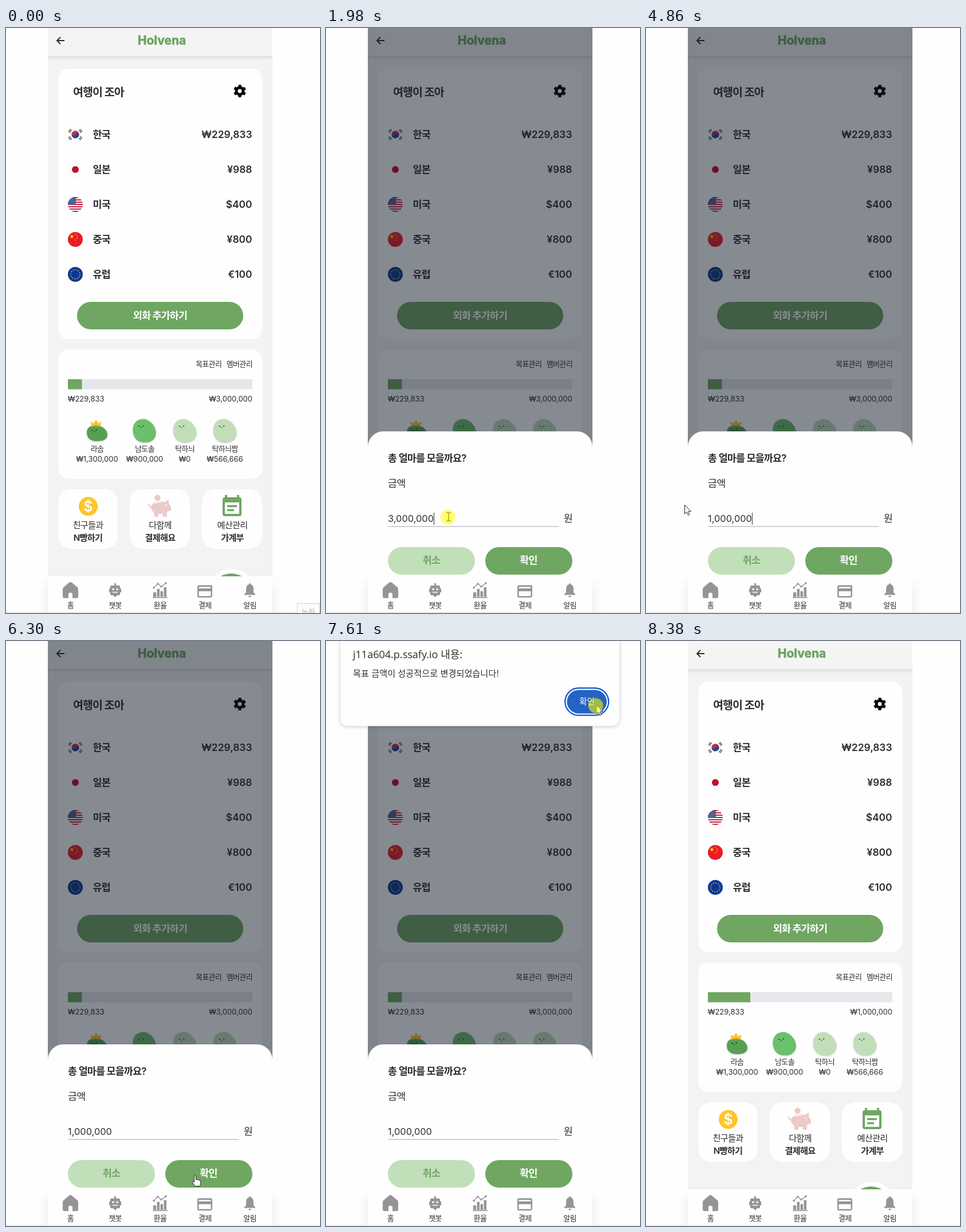
Recreate the animation shown at these times as an HTML page. Size 548 by 1021 pixels, loop 9.97 s.

```html
<!DOCTYPE html>
<html lang="ko">
<head>
<meta charset="utf-8">
<title>여행 모임 통장</title>
<style>
  html, body { margin: 0; width: 100%; height: 100%; overflow: hidden; background: #fefefe; }
  svg { display: block; width: 100%; height: 100%; }
  text { font: 13px Inter, "Noto Sans CJK KR", sans-serif; fill: #2e2e2e; }
  .k { letter-spacing: -.05em; }
  .b { font-weight: 600; }
  .l { font-size: 17.4px; }
  .n { font-size: 15.2px; }
  .m { text-anchor: middle; }
  .e { text-anchor: end; }
  .w { fill: #fff; }
  .g { fill: #6fa661; }
  .input { font-size: 16.4px; }
  .brand { font-size: 21px; font-weight: 700; fill: #6aa55f; stroke: #6aa55f; stroke-width: .6; stroke-linejoin: round; }
  .host { font: 18px "Open Sans", "Noto Sans CJK KR", sans-serif; }
  .notice { font: 15.2px "Noto Sans CJK KR", sans-serif; }
  .shade { filter: drop-shadow(0 1px 3px rgba(0,0,0,.22)); }
  .headshade { filter: drop-shadow(0 2px 3px rgba(0,0,0,.13)); }
  .soft { filter: drop-shadow(0 1.5px 1px rgba(0,0,0,.25)); }
  .navshade { filter: drop-shadow(0 14px 10px rgba(0,0,0,.1)); }
</style>
</head>
<body>
<svg viewBox="0 0 548 1021">
  <defs>
    <clipPath id="disc"><circle r="13"/></clipPath>
    <clipPath id="column"><rect x="73" width="392" height="957"/></clipPath>
    <clipPath id="selClip"><rect id="selMask" y="844" height="23"/></clipPath>
    <path id="star" d="M0-1 .24-.31 .95-.31 .38 .12 .59 .81 0 .4-.59 .81-.38 .12-.95-.31-.24-.31Z"/>
    <g id="face"><circle cx="-3.7" r="1"/><circle cx="3.7" cy="-.5" r="1"/><path d="M-1.4 1.8Q0 3.2 1.4 1.6" fill="none" stroke="#222" stroke-width=".8"/></g>
    <path id="bean" d="M-6-20C6-23 18-11 20 0C22 12 14 20 3 20C-12 21-20 12-20-2C-20-12-14-19-6-20Z"/>
  </defs>

  <rect width="548" height="1021" fill="#fefefe"/>
  <g clip-path="url(#column)">
    <rect x="73" width="392" height="1021" fill="#f3f3f3"/>
    <rect class="headshade" x="63" y="-5" width="412" height="54" fill="#f4f4f4"/>
    <path d="M102 22H89.5M95 16 89 22 95 28" fill="none" stroke="#2b2b2b" stroke-width="2"/>
    <text class="brand m" x="272" y="29">Holvena</text>

    <g fill="#fefefe">
      <rect x="91" y="71" width="356" height="472" rx="18"/>
      <rect x="91" y="561" width="356" height="226" rx="18"/>
      <rect x="91" y="805" width="104" height="104" rx="22"/>
      <rect x="216" y="805" width="105" height="104" rx="22"/>
      <rect x="342" y="805" width="105" height="104" rx="22"/>
    </g>
    <text class="k b" x="117" y="119" style="font-size:19.5px">여행이 조아</text>
    <g transform="translate(408 110)" fill="none" stroke="#000">
      <circle r="6" stroke-width="5"/>
      <circle r="9" stroke-width="3.8" stroke-dasharray="4.9 4.525" transform="rotate(14)"/>
    </g>

    <g id="accounts"></g>
    <g transform="translate(121 186)">
      <g stroke="#333" stroke-width="1.3">
        <path d="M-11.7-4.3-8.5-9.5M8.5 9.5 11.7 4.3M-11.7 4.3-8.5 9.5M8.5-9.5 11.7-4.3"/>
        <path d="M-9.7-3.2-6.5-8.4M6.5 8.4 9.7 3.2M-9.7 3.2-6.5 8.4M6.5-8.4 9.7-3.2" stroke-dasharray="2.7 .7"/>
      </g>
      <g transform="rotate(25)"><circle r="6.5" fill="#0f4aa0"/><path d="M-6.5 0A6.5 6.5 0 0 1 6.5 0A3.25 3.25 0 0 1 0 0A3.25 3.25 0 0 0-6.5 0" fill="#cf2c3c"/><circle cx="-3.25" r="3.25" fill="#cf2c3c"/><circle cx="3.25" r="3.25" fill="#0f4aa0"/></g>
    </g>
    <g transform="translate(121 247)"><circle r="12.7" fill="#fff" stroke="#f0f0f0" stroke-width=".7"/><circle r="6" fill="#c40d2e"/></g>
    <g transform="translate(121 308)" clip-path="url(#disc)">
      <rect x="-13" y="-13" width="26" height="26" fill="#fff"/>
      <path d="M0-13V13" stroke="#c4203b" stroke-width="26" stroke-dasharray="2"/>
      <rect x="-13" y="-13" width="14" height="14" fill="#39457d"/>
      <path d="M-12-10.5H1M-11-8H1M-12-5.5H1M-11-3H1M-12-.5H1" stroke="#fff" stroke-width=".9" stroke-dasharray="1 1.4"/>
    </g>
    <g transform="translate(121 369)"><circle r="13" fill="#e91c24"/>
      <g fill="#ffdf20"><use href="#star" transform="translate(-6 -5)scale(4)"/><use href="#star" transform="translate(0 -9)scale(1.4)"/><use href="#star" transform="translate(3 -6)scale(1.4)"/><use href="#star" transform="translate(3 -2)scale(1.4)"/><use href="#star" transform="translate(0 1)scale(1.4)"/></g>
    </g>
    <g transform="translate(121 430)"><circle r="13" fill="#0c3796"/><circle r="8" fill="none" stroke="#f5d020" stroke-width="1.6" stroke-dasharray="1.6 2.589"/></g>

    <rect class="g" x="124" y="478" width="290" height="48" rx="24"/>
    <text class="k b l m w" x="269" y="508">외화 추가하기</text>

    <text class="k" x="331" y="591">목표관리</text>
    <text class="k e" x="430" y="591">멤버관리</text>
    <rect x="108" y="613" width="322" height="17.5" fill="#e5e7eb"/>
    <rect id="bar" class="g" x="108" y="613" height="17.5"/>
    <text x="108" y="652">₩229,833</text>
    <text id="goal" class="e" x="430" y="652"></text>

    <g class="soft">
      <path transform="translate(159 707)" fill="#57a052" d="M-18-1C-18-12-8-15 2-13C12-11 18-4 18 3C18 11 10 14 0 14C-12 14-18 8-18-1Z"/>
      <use href="#bean" x="241.5" y="703" fill="#6bc06b"/>
      <use href="#bean" x="312" y="703" fill="#c1deb9"/>
      <use href="#bean" x="382" y="703" fill="#c1deb9"/>
    </g>
    <path d="M149 696 147.5 687 152.5 690 157 684 161.5 690 166.5 687 165 696Q157 693 149 696Z" fill="#fbc52d"/>
    <path d="M150 694.5Q157 692 164 694.5" fill="none" stroke="#e89a25"/>
    <g fill="#222"><use href="#face" x="154" y="702"/><use href="#face" x="236" y="695"/><use href="#face" x="306.5" y="695"/><use href="#face" x="376.5" y="695"/></g>
    <g id="members"></g>

    <circle cx="143.5" cy="835" r="16.5" fill="#fdc52b"/>
    <text class="m w b" x="143.5" y="844" style="font-size:25px">$</text>
    <g fill="#ebcaca">
      <circle cx="264.5" cy="820" r="5.3"/>
      <ellipse cx="269" cy="837" rx="16" ry="11"/>
      <path d="M276 828 284 823V830L288 836V842L282 844ZM258 844H266V853H259ZM273 844H281V853H274Z"/>
      <path d="M254 836Q249 836 249 830" fill="none" stroke="#ebcaca" stroke-width="2"/>
    </g>
    <path d="M260 829.5Q266 826.5 271 828" fill="none" stroke="#fff" stroke-width="1.7"/>
    <circle cx="279" cy="833" r="1.3" fill="#fff"/>
    <path d="M382 815H386V819H403V815H407V819Q411 819 411 823V848Q411 852 407 852H382Q378 852 378 848V823Q378 819 382 819Z" class="g"/>
    <path d="M382 828H407V848H382Z" fill="#fff"/>
    <path d="M386 834.5H403M386 841.5H398" stroke="#6fa661" stroke-width="3.5"/>
    <g id="shortcuts"></g>
    <circle cx="394" cy="987" r="43" fill="#fefefe"/><circle class="g" cx="393" cy="988" r="36"/>
  </g>

  <g id="modal" clip-path="url(#column)">
    <rect x="73" width="392" height="957" fill="rgba(17,24,39,.5)"/>
    <rect x="73" y="704" width="392" height="300" rx="27" fill="#fefefe"/>
    <text class="k b l" x="108" y="757">총 얼마를 모을까요?</text>
    <text class="k l" x="108" y="801">금액</text>
    <rect id="selBox" y="844" height="23" fill="#2f7fe0"/>
    <text id="amount" class="input" x="108" y="862"></text>
    <text class="input w" x="108" y="862" clip-path="url(#selClip)">3,000,000</text>
    <rect id="caret" y="846" width="1" height="21" fill="#333"/>
    <path d="M108 870H406" stroke="#d0cfd8" stroke-width="2"/>
    <text class="k l e" x="430" y="862">원</text>
    <rect x="108" y="906" width="152" height="48" rx="24" fill="#c1dfb9"/>
    <rect class="g" x="278" y="906" width="152" height="48" rx="24"/>
    <text class="k b l m g" x="184" y="935">취소</text>
    <text class="k b l m w" x="353.5" y="935">확인</text>
  </g>

  <rect class="navshade" x="73" y="957" width="392" height="64" fill="#fefefe"/>
  <g fill="#969496">
    <path d="M110 968Q112.5 966 115 968L124.5 976Q126 977.5 126 980V992Q126 995 123 995H116V988Q116 985.5 112.5 985.5T109 988V995H102Q99 995 99 992V980Q99 977.5 100.5 976Z"/>
    <path d="M189 969H192V973H197Q199 973 199 975V978H201V985H199V988Q199 990 197 990H194L190.5 993.5 187 990H184Q182 990 182 988V985H180V978H182V975Q182 973 184 973H189Z"/>
    <path d="M257 985H262V993H257ZM263.5 979H268V993H263.5ZM269.5 983H274V993H269.5ZM275.5 976H280V993H275.5ZM256 993.5H282V995H256Z"/>
    <path d="M258 977 265 970 271 975 279 969" fill="none" stroke="#969496" stroke-width="1.4"/>
    <circle cx="258" cy="977" r="1.8"/><circle cx="265" cy="970" r="1.8"/><circle cx="271" cy="975" r="1.8"/><circle cx="279" cy="969" r="1.8"/>
    <path fill-rule="evenodd" d="M337 972.5H357Q360 972.5 360 975.5V991Q360 994 357 994H337Q334 994 334 991V975.5Q334 972.5 337 972.5ZM336.5 975.5V978H357.5V975.5ZM336.5 983V991.5H357.5V983Z"/>
    <path d="M425.5 969Q427 969 427 971Q432 972.5 432 979V985L435 988V989.5H416V988L419 985V979Q419 972.5 424 971Q424 969 425.5 969ZM423 991H428Q427.5 993.5 425.5 993.5T423 991Z"/>
  </g>
  <g fill="#fefefe"><circle cx="187" cy="979.5" r="1.7"/><circle cx="194" cy="979.5" r="1.7"/><path d="M186 984H195V985.5H186Z"/></g>
  <g id="nav"></g>
  <path d="M0 1020.5H548" stroke="#dcdcdc"/>

  <g id="tooltip">
    <rect x="508.5" y="1004.5" width="38.5" height="20" fill="#fdfdfd" stroke="#cfcfcf"/>
    <text class="m" x="527.5" y="1024" style="fill:#b5b5b5">녹화</text>
  </g>

  <g id="alert">
    <rect class="shade" x="25" y="-20" width="487" height="168.5" rx="13" fill="#fefefe"/>
    <text class="host" x="47" y="30">j11a604.p.ssafy.io 내용:</text>
    <text class="notice" x="47" y="62">목표 금액이 성공적으로 변경되었습니다!</text>
    <rect x="417.2" y="82.2" width="76" height="47.5" rx="23.7" fill="none" stroke="#0b57d0" stroke-width="2.2"/>
    <rect id="alertOk" x="420.5" y="85.5" width="69.5" height="41" rx="20.5"/>
    <text class="m w" x="455.5" y="111" style="font-size:14.5px">확인</text>
  </g>

  <g id="cursor" stroke="#222" fill="#fff" stroke-linejoin="round">
    <path id="arrow" d="M0 0V15.5L3.6 12.3 6 17.7 8.5 16.6 6.2 11.3H11Z"/>
    <path id="beam" fill="none" stroke-width="1.3" d="M-4-7.5Q0-7.5 0-5.5Q0-7.5 4-7.5M0-5.5V5.5M-4 7.5Q0 7.5 0 5.5Q0 7.5 4 7.5"/>
    <path id="hand" d="M-1.5 1Q0-1 1.5 1V7Q3.2 5.8 4.5 7.5Q6 6.6 7.2 8.2Q9.8 7.7 9.8 10V13Q9.5 15.5 8 18.5H0L-5 11.5Q-4.5 8.8-1.5 11.5Z"/>
  </g>
  <circle id="press" r="13" fill="rgba(255,255,0,.56)"/>
</svg>
<script>
const LOOP = 9970;
const MODAL_OPEN = 1090, SELECT = 2110, RETYPE = 3590, SUBMIT = 6100, ALERT_OPEN = 6500, ALERT_CLOSE = 7690;
const $ = id => document.getElementById(id);
const label = (x, y, cls, s) => `<text x="${x}" y="${y}" class="${cls}">${s}</text>`;

$('accounts').innerHTML = [['한국', '₩229,833'], ['일본', '¥988'], ['미국', '$400'], ['중국', '¥800'], ['유럽', '€100']]
  .map(([name, sum], i) => label(151.5, 192 + 61 * i, 'k b l', name) + label(429.5, 192 + 61 * i, 'b l e', sum)).join('');
$('members').innerHTML = [[159, '라솜', '₩1,300,000'], [242, '남도솔', '₩900,000'], [312, '탁하늬', '₩0'], [382, '탁하늬짭', '₩566,666']]
  .map(([x, name, sum]) => label(x, 739, 'k m', name) + label(x, 757, 'm', sum)).join('');
$('shortcuts').innerHTML = [['친구들과', 'N빵하기'], ['다함께', '결제해요'], ['예산관리', '가계부']]
  .map(([a, b], i) => label(143 + 126 * i, 873, 'k n m', a) + label(143 + 126 * i, 895, 'k n b m', b)).join('');
$('nav').innerHTML = ['홈', '챗봇', '환율', '결제', '알림']
  .map((s, i) => label(112.3 + 78.3 * i, 1012, 'k m', s)).join('');

// time, x, y of the pointer's hot spot wherever it rests or turns
const path = [
  [0, 536, 1004], [680, 352, 586], [1360, 352, 586], [1950, 214, 853], [SELECT, 214, 853],
  [2310, 182, 851], [2510, 182, 851], [2920, 82, 846], [3060, 67.5, 832.5], [5330, 67.5, 832.5],
  [5700, 486, 998], [5960, 352, 935], [6220, 352, 935], [6300, 330, 933], [6480, 326, 931],
  [7450, 472, 112], [ALERT_CLOSE, 472, 112], [8100, 489, 52], [8330, 509, 843]
];
const typing = [[0, '3,000,000'], [RETYPE, '1'], [3790, '10'], [3990, '100'], [4120, '1,000'],
  [4530, '10,000'], [4660, '100,000'], [4860, '1,000,000']];
const presses = [[950, MODAL_OPEN], [1950, 2930], [SUBMIT, 6230], [7520, ALERT_CLOSE]];

const within = (t, a, b) => t >= a && t < b;
const show = (id, on) => $(id).setAttribute('visibility', on ? 'inherit' : 'hidden');
const set = (id, attrs) => { for (const k in attrs) $(id).setAttribute(k, attrs[k]); };
const smooth = u => u * u * (3 - 2 * u);

function pointerAt(t) {
  const i = path.findIndex(p => p[0] > t);
  if (i < 0) return path[path.length - 1].slice(1);
  const [t0, x0, y0] = path[i - 1], [t1, x1, y1] = path[i];
  const u = smooth((t - t0) / (t1 - t0));
  return [x0 + (x1 - x0) * u, y0 + (y1 - y0) * u];
}

function pointerKind(t, x, y) {
  if (within(t, SELECT, 2930)) return 'beam';
  if (!within(t, MODAL_OPEN, ALERT_OPEN)) return 'arrow';
  if (within(y, 906, 954) && (within(x, 108, 260) || within(x, 278, 430))) return 'hand';
  return within(x, 108, 406) && within(y, 840, 870) ? 'beam' : 'arrow';
}

function render(t) {
  show('tooltip', t < 70);
  show('modal', within(t, MODAL_OPEN, ALERT_CLOSE));
  show('alert', within(t, ALERT_OPEN, ALERT_CLOSE));

  const grow = Math.min(1, Math.max(0, (t - ALERT_CLOSE) / 300));
  set('bar', { width: 24.5 + 49.5 * smooth(grow) });
  $('goal').textContent = t >= ALERT_CLOSE ? '₩1,000,000' : '₩3,000,000';

  const [x, y] = pointerAt(t);
  const kind = pointerKind(t, x, y);
  set('cursor', { transform: `translate(${x} ${y})` });
  show('cursor', within(t, 70, 8375));
  for (const k of ['arrow', 'beam', 'hand']) $(k).style.display = k === kind ? '' : 'none';
  set('press', { cx: x - 1.3, cy: y + .8 });
  show('press', presses.some(([a, b]) => within(t, a, b)));
  set('alertOk', { fill: t >= 7360 ? '#2563c4' : '#0b57d0' });

  $('amount').textContent = typing.filter(k => k[0] <= t).pop()[1];
  const end = 108 + $('amount').getComputedTextLength();
  const selecting = within(t, SELECT, RETYPE) && x < end;
  const from = !selecting ? end : t < 2920 ? Math.max(108, x) : 108;
  const range = { x: from, width: end - from };
  set('selBox', range);
  set('selMask', range);
  set('caret', { x: end });
  show('caret', within(t, 1950, SUBMIT) && !selecting);
}

let start;
function tick(now) {
  start ??= now;
  render((now - start) % LOOP);
  requestAnimationFrame(tick);
}
render(0);
requestAnimationFrame(tick);
</script>
</body>
</html>
```
